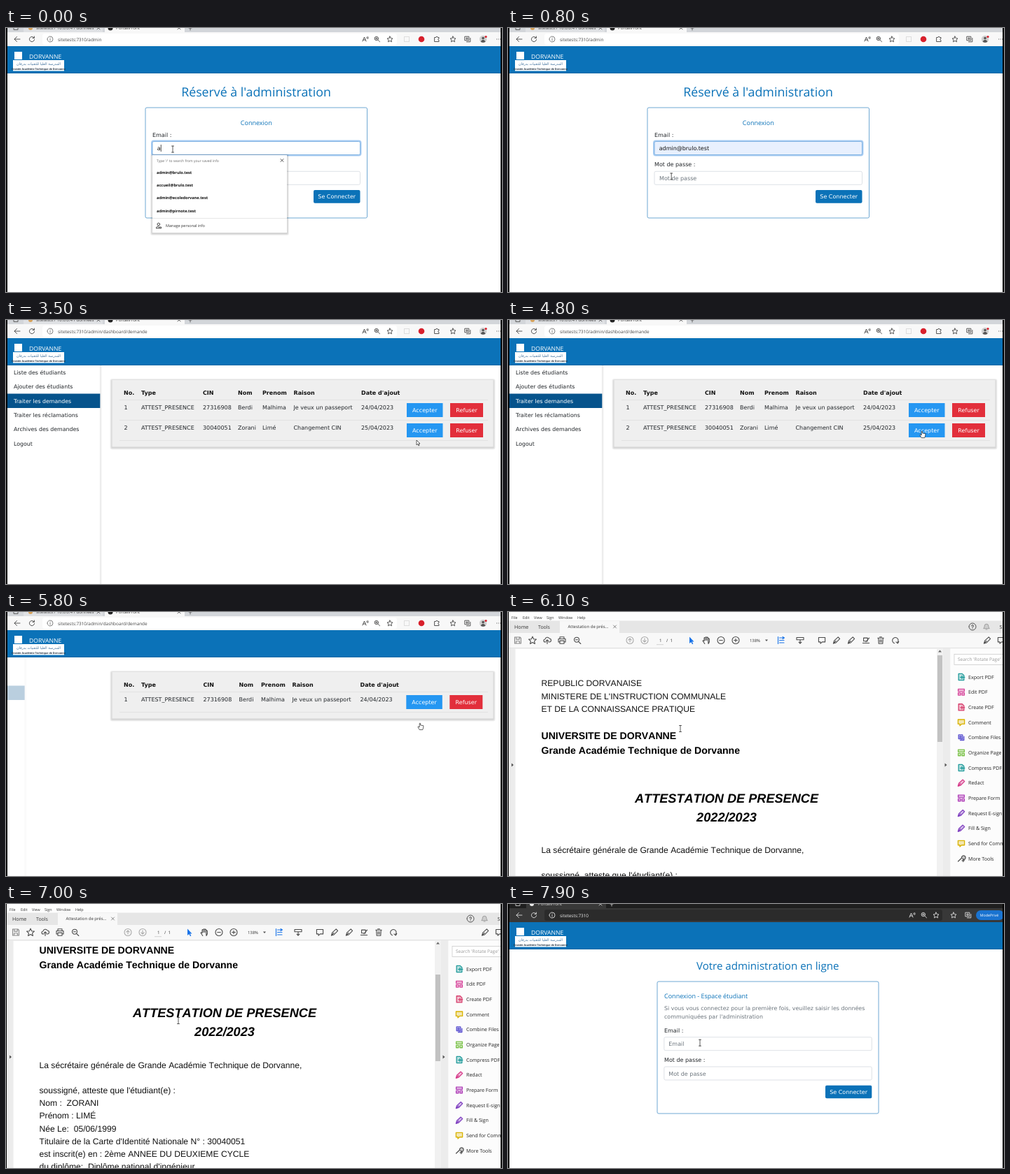
Animation, 708 px wide and 378 px high, one loop 8000 ms. Source, as an HTML page:

```html
<!DOCTYPE html>
<html lang="fr">
<head>
<meta charset="utf-8">
<title>Administration</title>
<style>
html, body { margin: 0; width: 100%; height: 100%; overflow: hidden; background: #fff; }
svg { display: block; width: 100%; height: 100%; }
text { white-space: pre; text-rendering: geometricPrecision; }
.ui { font-family: "Open Sans", "Noto Sans", sans-serif; }
.page { font-family: "DejaVu Sans", sans-serif; }
.doc { font-family: "Liberation Sans", sans-serif; font-kerning: none; }
.b { font-weight: 700; }
.i { font-style: italic; }
.mid { text-anchor: middle; }
</style>
</head>
<body>
<svg id="stage" viewBox="0 0 708 378" preserveAspectRatio="none"></svg>
<script>
const LOOP = 8000;
const BLUE = '#0b72b8', INK = '#212529', GRAY = '#6c757d';
const HOST = 'sitetests:7310', MAIL = 'admin@brulo.test';
const SCHOOL = 'Grande Académie Technique de Dorvanne';

const clamp = v => Math.min(1, Math.max(0, v));
const progress = (t, from, to) => clamp((t - from) / (to - from));
const ease = p => p * p * (3 - 2 * p);
const mix = (a, b, p) => a + (b - a) * p;

// Drawing helpers
const text = (x, y, s, size, cls = 'page', fill = INK) =>
  `<text x="${x}" y="${y}" font-size="${size}" class="${cls}" fill="${fill}">${s.replace(/&/g, '&amp;')}</text>`;
const rect = (x, y, w, h, fill, extra = '') =>
  `<rect x="${x}" y="${y}" width="${w}" height="${h}" fill="${fill}" ${extra}/>`;
const circle = (x, y, r, fill) => `<circle cx="${x}" cy="${y}" r="${r}" fill="${fill}"/>`;
const at = (x, y, body, extra = '') => `<g transform="translate(${x} ${y})" ${extra}>${body}</g>`;
const line = (d, color, w = 0.9, fill = 'none') =>
  `<path d="${d}" fill="${fill}" fill-opacity=".3" stroke="${color}" stroke-width="${w}" stroke-linecap="round" stroke-linejoin="round"/>`;
const shadow = (x, y, w, h, spread = 3) => [3, 2, 1].map(k => {
  const s = spread * k / 3;
  return rect(x - s, y - s + 1, w + 2 * s, h + 2 * s, '#000', `opacity=".06" rx="${s}"`);
}).join('');

const ICONS = {
  back: 'M4 0H-4M-.5-3.5L-4 0L-.5 3.5',
  reload: 'M3-2A3.6 3.6 0 1 0 3.6 .6M3.4-4V-1.6H1',
  rotate: 'M-1.5 4.2A4.2 4.2 0 1 1 3.2 2.8M1 2.4L3.2 4.4L4.8 2',
  info: 'M-4 0a4 4 0 1 0 8 0a4 4 0 1 0-8 0M0-.4V2M0-2v.2',
  read: 'M-4 3L-1.5-3L1 3M-3.2 1H.2M2-3q1 1 0 2M3.5-3.6q1.6 1.6 0 3.2',
  zoom: 'M2.5-.8a3.5 3.5 0 1 0-7 0a3.5 3.5 0 1 0 7 0M1.6 1.8L4.8 5M-2.5-.8H.5',
  zoomIn: 'M1.5-1a2.7 2.7 0 1 0-5.4 0a2.7 2.7 0 1 0 5.4 0M.8 1L3.6 3.8M-2.4-1H0M-1.2-2.2V.2',
  star: 'M0-4L1.2-1.4L4-1L2 1L2.5 3.8L0 2.4L-2.5 3.8L-2 1L-4-1L-1.2-1.4Z',
  bigStar: 'M0-5.4L1.6-1.8L5.4-1.4L2.6 1.2L3.4 5L0 3L-3.4 5L-2.6 1.2L-5.4-1.4L-1.6-1.8Z',
  puzzle: 'M-3-2.5H-1.2a1.2 1.2 0 1 1 2.4 0H3V-.8a1.2 1.2 0 1 0 0 2.4V3.5H-3Z',
  layers: 'M-3.8-3.8H1.8V1.8H-3.8ZM-1.5 3.8H3.8V-1.5M-1-2.4V.6M-2.5-.9H.5',
  key: 'M3.4-2.4a1.7 1.7 0 1 0-2 2L-3 3.5M-2.4 2.8l1.2 1',
  dots: 'M-2.5 0h.2M0 0h.2M2.5 0h.2',
  eye: 'M-4.5 1.2Q0-5 4.5 1.2M1.8 1a1.8 1.8 0 1 0-3.6 0a1.8 1.8 0 1 0 3.6 0',
  cross: 'M-2-2L2 2M2-2L-2 2',
  person: 'M1.6-2a1.8 1.8 0 1 0-3.6 0a1.8 1.8 0 1 0 3.6 0M-3.5 3.6V2.6Q-3.5 1 0 1M-3.5 3.6H0M1 2H3.5V3.8H1Z',
  save: 'M-4.5-4.5H3L4.5-3V4.5H-4.5ZM-2.3-4.5V-1.4H2.3V-4.5M-2.5 4.5V1.2H2.5V4.5',
  cloud: 'M-2 2.5H-3a2 2 0 0 1 0-4a3.2 3.2 0 0 1 6-1a2.4 2.4 0 0 1 0 5H2M0 5V-.5M-1.8 1.2L0-.6L1.8 1.2',
  print: 'M-3 2.5H-5V-2H5V2.5H3M-3-2V-4.8H3V-2M-3 .6H3V4.8H-3Z',
  up: 'M-5 0a5 5 0 1 0 10 0a5 5 0 1 0-10 0M0 2.6V-2.6M-2.2-.4L0-2.6L2.2-.4',
  down: 'M-5 0a5 5 0 1 0 10 0a5 5 0 1 0-10 0M0-2.6V2.6M-2.2 .4L0 2.6L2.2 .4',
  minus: 'M-5 0a5 5 0 1 0 10 0a5 5 0 1 0-10 0M-2.3 0H2.3',
  plus: 'M-5 0a5 5 0 1 0 10 0a5 5 0 1 0-10 0M-2.3 0H2.3M0-2.3V2.3',
  hand: 'M-2.2 5L-5 .8Q-4.4-.4-3 1V-3.4Q-2.2-4.6-1.3-3.4V0M-1.3-4Q-.4-5.6 .6-4V0M.6-3.8Q1.6-5 2.5-3.6V0M2.5-2Q3.5-3.2 4.4-2V1.6Q4.2 3.6 3 5Z',
  fit: 'M-4.5-5V5M-2.5-3.5H4M-2.5 0H4M-2.5 3.5H4M2-5L4.5-3.5L2-2',
  tray: 'M-5-4H5V-.8H-5ZM0-.5V4.5M-1.9 2.6L0 4.6L1.9 2.6',
  note: 'M-4.6-4H4.6V2.4H.5L-2 4.7V2.4H-4.6Z',
  pen: 'M-4.6 4.6L-3.4 .6L2.2-4.6L4.6-2.2L-.8 3.4ZM-4.6 4.6L-1 1',
  stamp: 'M-4.6 4H4.6M-3.4-3.4H2.2V1.2H-3.4ZM0 2.2L4.6-3.4',
  trash: 'M-4.2-3.2H4.2M-1.4-4.8H1.4M-3.3-3.2L-2.8 4.8H2.8L3.3-3.2M-1-1V2.8M1-1V2.8',
  help: 'M-5 0a5 5 0 1 0 10 0a5 5 0 1 0-10 0M-1.4-1a1.4 1.4 0 1 1 1.4 1.4V1.2M0 2.7v.1',
  bell: 'M-4 2.4Q-2.8 1-2.8-1a2.8 2.8 0 0 1 5.6 0Q2.8 1 4 2.4ZM-1 4H1',
  sheet: 'M-3.8-4.6H1.3L3.8-2.2V4.6H-3.8ZM1-1.5V2.4M-1.2 .5H4.8',
  boxes: 'M-4.4-4.2H4.4V-1H-4.4ZM-4.4 1H-1V4.4H-4.4ZM1 1H4.4V4.4H1Z',
  wrench: 'M-4.4 4L.5-.8A2.8 2.8 0 1 1 3.2 1.5L2-.2M1 2.8H4.4M2.7 1.1V4.5'
};
const icon = (name, x, y, color = '#444', w, fill) => at(x, y, line(ICONS[name], color, w, fill));
const icons = (list, y, color, w) => list.map(([name, x, tint]) => icon(name, x, y, tint || color, w)).join('');

// Mouse pointers
const ibeam = (x, y) => at(x, y, line('M-1.5-4.5H1.5M0-4.5V4.5M-1.5 4.5H1.5', '#333', 0.8));
const arrow = (x, y) => at(x, y,
  '<path d="M0 0V7L1.7 5.5L2.9 8L4 7.5L2.9 5H5Z" fill="#fff" stroke="#222" stroke-width=".7"/>');
const pointer = (x, y) => at(x, y,
  '<path d="M-1.8-4.5V1L-3.5-.2L-4 .8L-1.8 4.6H2.8L3.8 1V-1.3L-.4-2V-4.5Q-1-5.3-1.8-4.5Z" fill="#fff" stroke="#222" stroke-width=".7"/>');

const sideBars = leftWidth => rect(0, 0, leftWidth, 378, '#000') + rect(706, 0, 2, 378, '#000');

function banner() {
  return rect(0, 26, 708, 39, BLUE) + rect(0, 64, 708, 1, '#0a66a5')
    + rect(12, 34, 11, 11, '#fff')
    + text(33, 44, 'DORVANNE', 8.6, 'ui', '#fff')
    + rect(10, 46, 73, 15.5, '#fff')
    + text(46.5, 53, 'المدرسة العليا للتقنيات بدرفان', 5, 'page mid', '#3c6f9c')
    + text(46.5, 59.8, SCHOOL, 3.7, 'ui b mid', '#234');
}

function lightBrowser(path, hasKey) {
  return rect(0, 0, 708, 26, '#f8f8f8') + rect(0, 0, 708, 6, '#d3d6da')
    + rect(25, -4, 113, 10, '#dfe1e4') + rect(141, -4, 114, 12, '#f8f8f8', 'rx="2"')
    + line('M11-2V2.5H17V-2', '#555') + circle(35, 0, 3, '#d8a35b') + circle(149, 0, 3.5, '#222')
    + text(43, 2, 'sitetests / 10.0.0.4 / donnees', 6.2, 'ui', '#444')
    + text(157, 2, 'PortailFront', 6.2, 'ui', '#333')
    + icon('cross', 132, 0, '#555') + icon('cross', 247, 0, '#555') + line('M263-3V3M261 0H265', '#555')
    + rect(52, 8, 506, 16, '#fff', 'rx="3"')
    + icons([['back', 16], ['reload', 37], ['info', 63, '#777'], ['read', 513], ['zoomIn', 530], ['star', 548],
      ['puzzle', 615], ['star', 638], ['layers', 659], ['dots', 703]], 16, '#444')
    + (hasKey ? icon('key', 495, 16, '#777') : '')
    + rect(568.5, 12.5, 7, 7, 'none', 'stroke="#ddd"') + circle(593, 16, 4.3, '#d8202c')
    + circle(681, 16, 5.2, '#d0d0d0') + circle(681, 14.5, 1.8, '#555')
    + '<path d="M677.5 19.5Q681 14 684.5 19.5Q681 22 677.5 19.5Z" fill="#555"/>' + circle(685, 12.5, 1.6, '#d8202c')
    + text(74, 18.5, HOST + path, 6.4, 'ui', '#444') + banner();
}

function darkBrowser() {
  return rect(0, 0, 708, 26, '#383838') + rect(0, 0, 708, 6, '#1f1f1f') + rect(26, -4, 114, 12, '#383838', 'rx="2"')
    + line('M11-2V2.5H17V-2', '#ccc') + circle(34, 0, 3, '#eee')
    + text(43, 2, 'PortailFront', 6.2, 'ui', '#ddd')
    + icon('cross', 132, 0, '#ccc') + line('M148-3V3M146 0H150', '#ccc')
    + rect(52, 8, 568, 16, '#2b2b2b', 'rx="3"')
    + icons([['back', 16], ['reload', 37], ['info', 63], ['read', 577], ['zoomIn', 594], ['star', 611],
      ['star', 636], ['layers', 657]], 16, '#ddd')
    + rect(668, 9, 40, 14, '#1a73d0', 'rx="7"') + text(687, 18, 'ModePrivé', 5.3, 'ui mid', '#fff')
    + text(74, 18.5, HOST, 6.4, 'ui', '#eee') + banner();
}

const card = (x, y, w, h) => rect(x, y, w, h, '#fff', 'rx="2" stroke="#6fa8d3" stroke-width="1"');
const field = (x, y, focused, fill = '#fff') =>
  (focused ? rect(x - 1, y - 1, 298.5, 21, 'none', 'rx="3" stroke="#a9cdf3" stroke-width="2"') : '')
  + rect(x, y, 296.5, 19, fill, `rx="2" stroke="${focused ? '#6aa5dc' : '#d5dae0'}" stroke-width=".8"`);
const button = (x, y, w, h, label, fill, r = 0) =>
  rect(x, y, w, h, fill, `rx="${r}"`) + text(x + w / 2, y + h / 2 + 3, label, 8, 'page mid', '#fff');
const caret = (x, y) => rect(x, y - 5, 0.8, 10, '#222');

function suggestions() {
  const mails = [MAIL, 'accueil@brulo.test', 'admin@ecoledorvane.test', 'admin@pirnote.test'];
  return shadow(209, 182, 192, 111) + rect(209, 182, 192, 111, '#fff')
    + text(215, 192, "Type '/' to search from your saved info", 5, 'ui', '#666')
    + icon('cross', 394, 189.5, '#444')
    + mails.map((m, k) => text(215, 209.2 + 18.1 * k, m, 5.6, 'ui b', '#111')).join('')
    + rect(209, 272.3, 192, 0.7, '#ddd')
    + icon('person', 218, 283, '#333') + text(228, 285.3, 'Manage personal info', 5.5, 'ui', '#333');
}

const KEY_TIMES = [2200, 2300, 2400, 2600, 2800, 2900, 3100, 3300];

function loginScene(t) {
  const filled = t >= 100, onPassword = t >= 1200;
  const typed = KEY_TIMES.filter(k => t >= k).length;
  const move = ease(progress(t, 300, 1100));
  return lightBrowser('/admin', typed > 0)
    + text(357, 97.5, "Réservé à l'administration", 17.8, 'ui mid', BLUE)
    + card(199, 114, 316.5, 158) + text(357.3, 139, 'Connexion', 9, 'ui mid', BLUE)
    + text(209, 156, 'Email :', 8) + field(209, 162.5, !onPassword, filled ? '#e8f0fe' : '#fff')
    + text(215.7, 175, filled ? MAIL : 'a', 8, 'page', '#111')
    + (filled ? '' : caret(220.8, 172))
    + text(209, 198.3, 'Mot de passe :', 8) + field(209, 205.3, onPassword)
    + (typed ? text(216, 217.8, '•'.repeat(typed), 8, 'page', '#111') + icon('eye', 492, 214.5, '#333')
      : text(216, 217.8, 'Mot de passe', 8, 'page', GRAY))
    + (onPassword ? caret(216 + 4.72 * typed, 214.7) : '')
    + button(439, 232, 66.5, 18.7, 'Se Connecter', BLUE, 2)
    + (filled ? '' : suggestions())
    + (filled ? ibeam(mix(238, 231, move), mix(207, 215, move)) : ibeam(238, 173.5));
}

function sidebar(shift, opacity) {
  const items = ['Liste des étudiants', 'Ajouter des étudiants', 'Traiter les demandes',
    'Traiter les réclamations', 'Archives des demandes', 'Logout'];
  return at(shift, 0, rect(1, 65, 133.5, 313, '#fff') + rect(134.3, 65, 1, 313, '#ddd')
    + rect(135.3, 65, 1.5, 313, '#f3f3f3') + rect(1, 105.5, 133.3, 20.5, '#06538c')
    + items.map((s, k) => text(11, 78 + 20.3 * k, s, 7.85, 'page', k === 2 ? '#fff' : INK)).join(''),
    `opacity="${opacity}"`);
}

function table(rowCount) {
  const both = rowCount === 2;
  const columns = both ? [168, 193, 281, 331, 366, 410.5, 507] : [168, 193, 281.5, 332.5, 364, 408.5, 505.5];
  const [accept, refuse] = both ? [572, 634] : [571.3, 633.3];
  const rows = [
    ['1', 'ATTEST_PRESENCE', '27316908', 'Berdi', 'Malhima', 'Je veux un passeport', '24/04/2023'],
    ['2', 'ATTEST_PRESENCE', '30040051', 'Zorani', 'Limé', 'Changement CIN', '25/04/2023']
  ].slice(0, rowCount);
  const height = 37.5 + 29 * rowCount;
  return shadow(151.5, 86, 544, height) + rect(151.5, 86, 544, height, '#efefef')
    + ['No.', 'Type', 'CIN', 'Nom', 'Prenom', 'Raison', "Date d'ajout"]
      .map((s, k) => text(columns[k], 107, s, 8, 'page b', '#111')).join('')
    + rect(162, 114, 526, 0.7, '#ddd')
    + rows.map((row, r) => {
      const y = 29 * r;
      return row.map((s, k) => text(columns[k] + (k ? 0 : 0.5), 127.8 + y, s, 8)).join('')
        + button(accept, 119 + y, 51.5, 20, 'Accepter', '#2597f2')
        + button(refuse, 119 + y, 47, 20, 'Refuser', '#e22f3b')
        + rect(162, 143.3 + y, 526, 0.7, '#ddd');
    }).join('');
}

function dashboardScene(t) {
  const entering = t >= 5700, p = progress(t, 5700, 6230);
  const menu = entering ? sidebar(mix(-133, 0, p), mix(0.1, 1, p)) : sidebar(0, 1);
  const approach = progress(t, 3900, 4100);
  const mouse = t < 4100 ? arrow(mix(586, 590, approach), mix(172, 166, approach))
    : pointer(592, t < 4300 ? 169 : t < 4800 ? 167 : 164);
  return lightBrowser('/admin/dashboard/demande') + menu + table(t < 5400 ? 2 : 1) + mouse;
}

function documentPage() {
  const lines = ['soussigné, atteste que l\'étudiant(e) :', 'Nom :  ZORANI', 'Prénom : LIMÉ', 'Née Le:  05/06/1999',
    "Titulaire de la Carte d'Identité Nationale N° : 30040051", 'est inscrit(e) en : 2ème ANNEE DU DEUXIEME CYCLE',
    "du diplôme:  Diplôme national d'ingénieur"];
  const body = (y, s) => text(47.5, y, s, 12.13, 'doc', '#111');
  const bold = (y, s) => text(47.5, y, s, 14.1, 'doc b', '#000');
  const heading = (y, s) => text(312, y, s, 18.15, 'doc b i mid', '#000');
  return body(106.3, 'REPUBLIC DORVANAISE') + body(124.5, "MINISTERE DE L'INSTRUCTION COMMUNALE")
    + body(142.7, 'ET DE LA CONNAISSANCE PRATIQUE')
    + bold(181.7, 'UNIVERSITE DE DORVANNE') + bold(202.8, SCHOOL)
    + heading(272.5, 'ATTESTATION DE PRESENCE') + heading(299.8, '2022/2023')
    + body(345, `La sécrétaire générale de ${SCHOOL},`)
    + lines.map((s, k) => body(381.4 + 18.2 * k, s)).join('');
}

function pdfScene(t) {
  const p = ease(progress(t, 6250, 6750));
  const menu = [['File', 5], ['Edit', 21], ['View', 37], ['Sign', 55], ['Window', 72], ['Help', 99]];
  const tools = [['Export PDF', 'sheet', '#1f9a9a'], ['Edit PDF', 'boxes', '#d6459a'], ['Create PDF', 'sheet', '#d63a6a'],
    ['Comment', 'note', '#d9b200'], ['Combine Files', 'layers', '#5a50d0'], ['Organize Page', 'boxes', '#7cc24a'],
    ['Compress PDF', 'sheet', '#1f9a9a'], ['Redact', 'pen', '#d63a8a'], ['Prepare Form', 'boxes', '#b040b8'],
    ['Request E-sign', 'pen', '#8040c0'], ['Fill & Sign', 'pen', '#8040c0'], ['Send for Comm', 'note', '#d9b200'],
    ['More Tools', 'wrench', '#555']];
  return rect(0, 0, 708, 378, '#fff') + at(0, mix(0, -110.3, p), documentPage())
    + rect(0, 0, 708, 13, '#fdfdfd')
    + menu.map(([s, x]) => text(x, 9.6, s, 5.4, 'ui', '#333')).join('')
    + rect(0, 12.5, 708, 18, '#e6e6e6') + rect(74, 13, 85, 18, '#f8f8f8')
    + text(9, 23.5, 'Home', 7.2, 'ui', '#333') + text(43, 23.5, 'Tools', 7, 'ui', '#333')
    + text(85.5, 23.3, 'Attestation de prés...', 6, 'ui', '#333') + icon('cross', 152.5, 21, '#555', 0.7)
    + icon('help', 663, 21) + icon('bell', 683, 21, '#999', 0.9, '#999') + text(701.5, 23.5, 'S', 7, 'ui', '#333')
    + rect(0, 30, 708, 22, '#f8f8f8') + rect(0, 51.5, 708, 0.8, '#d0d0d0')
    + icons([['save', 14, '#888'], ['bigStar', 35], ['cloud', 56], ['print', 77], ['zoom', 99], ['up', 174, '#aaa'],
      ['down', 195, '#aaa'], ['hand', 283], ['minus', 304], ['plus', 325], ['fit', 390, '#1a73e8'], ['tray', 417],
      ['note', 448], ['pen', 469], ['pen', 490], ['stamp', 511], ['trash', 532], ['rotate', 553], ['pen', 684],
      ['note', 704]], 40.5, '#4a4a4a', 1.1)
    + '<path d="M259 35.5V45L261.3 43L263 46.3L264.3 45.6L262.7 42.5H265.5Z" fill="#1a73e8"/>'
    + text(216, 43, '1', 6.2, 'ui', '#333') + text(226, 43, '/  1', 6.2, 'ui', '#333')
    + rect(212, 46.5, 10, 0.6, '#bbb') + text(345, 42.8, '138%', 5.9, 'ui', '#333')
    + '<path d="M367 39.5H371L369 42Z" fill="#555"/>'
    + rect(0, 52.3, 10.5, 326, '#ececec') + '<path d="M5 216.5L8 219L5 221.5Z" fill="#555"/>'
    + rect(612, 52.3, 9, 326, '#f1f1f1') + '<path d="M614 57.5L616.5 54.5L619 57.5Z" fill="#666"/>'
    + rect(613, mix(62, 101, p), 7, 124, '#c2c2c2')
    + rect(621, 52.3, 10.5, 326, '#ececec') + '<path d="M623.5 216.5L626.5 219L623.5 221.5Z" fill="#555"/>'
    + rect(631.5, 52.3, 77, 326, '#fcfcfc')
    + rect(637, 60.5, 80, 15, '#fff', 'stroke="#ccc" stroke-width=".8"')
    + text(642, 70.3, "Search 'Rotate Page'", 6.5, 'ui', '#999')
    + tools.map(([s, name, color], k) =>
      icon(name, 647, 93 + 21.67 * k, color, 1.3, color) + text(657, 95.7 + 21.67 * k, s, 7.1, 'ui', '#222')).join('')
    + ibeam(246, 167);
}

function studentScene() {
  return darkBrowser()
    + text(370.7, 94.3, 'Votre administration en ligne', 15.1, 'ui mid', BLUE)
    + card(213, 111, 316, 189) + text(223, 135.3, 'Connexion - Espace étudiant', 9, 'ui', BLUE)
    + text(223, 152, 'Si vous vous connectez pour la première fois, veuillez saisir les données', 7.93, 'page', GRAY)
    + text(223, 164, "communiquées par l'administration", 7.93, 'page', GRAY)
    + text(223, 183.8, 'Email :', 8) + field(222.8, 190.7) + text(229.3, 203.2, 'Email', 8, 'page', GRAY)
    + text(223, 226.2, 'Mot de passe :', 8) + field(222.8, 233) + text(229.3, 245.6, 'Mot de passe', 8, 'page', GRAY)
    + button(453, 259.8, 66.3, 18.5, 'Se Connecter', BLUE, 2) + ibeam(274, 198.7);
}

function scene(t) {
  if (t < 3500) return loginScene(t) + sideBars(2);
  if (t < 6000) return dashboardScene(t) + sideBars(2);
  if (t < 7100) return pdfScene(t) + sideBars(1);
  return studentScene() + sideBars(2);
}

const stage = document.getElementById('stage');
let shown = '';
function frame() {
  const picture = scene(performance.now() % LOOP);
  if (picture !== shown) stage.innerHTML = shown = picture;
  requestAnimationFrame(frame);
}
frame();
</script>
</body>
</html>
```
